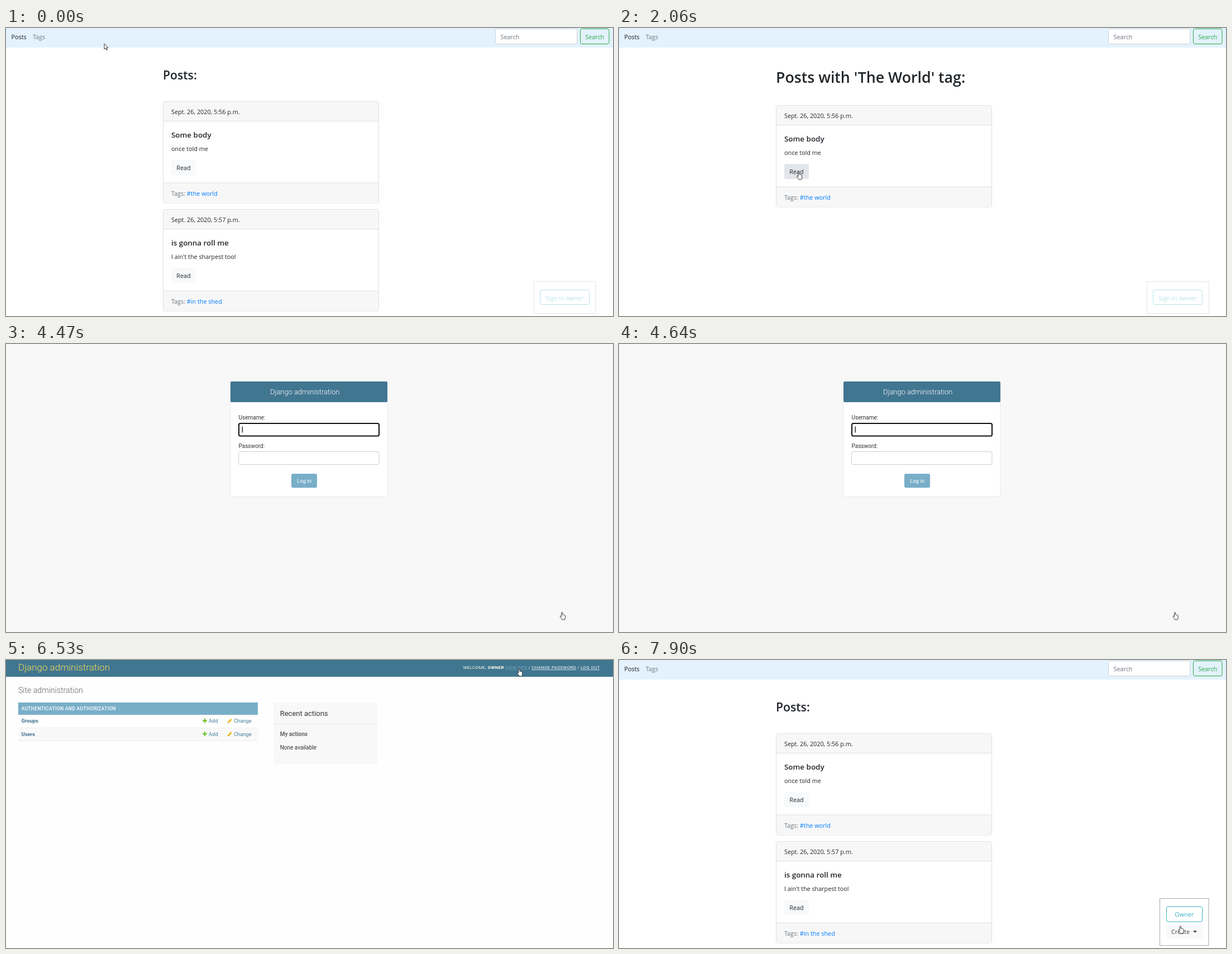
Recreate the animation shown at these times as an HTML page. Size 1087x515 px, loop 8 s.

```html
<!DOCTYPE html>
<html lang="en">
<head>
<meta charset="utf-8">
<title>Blog walkthrough</title>
<style>
  html, body { margin: 0; width: 100%; height: 100%; overflow: hidden; background: #fff; }
  svg { display: block; width: 100vw; height: 100vh; }
  text { white-space: pre; }
  .blog { font: 10.8px "Open Sans", "Noto Sans", sans-serif; }
  .blog .head { font-weight: 600; }
  .panel { font: 10px Roboto, Arial, sans-serif; }
  .caps { letter-spacing: .36px; }
</style>
</head>
<body>
<svg viewBox="0 0 1087 515"><g id="page"></g><g id="cursor"></g></svg>
<script>
const LOOP = 8000, STEP = 172, LEAD = 16;
const INK = '#212529', TEAL = '#17a2b8', NAVY = '#417690', SKY = '#79aec8', LINK = '#447e9b';

const rect = (x, y, w, h, fill, extra = '') =>
  `<rect x="${x}" y="${y}" width="${w}" height="${h}" fill="${fill}" ${extra}/>`;
const box = (x, y, w, h, fill, stroke, r = 3) => rect(x, y, w, h, fill, `stroke="${stroke}" rx="${r}"`);
const text = (x, y, str, fill = INK, extra = '') => `<text x="${x}" y="${y}" fill="${fill}" ${extra}>${str}</text>`;
const mid = (x, y, str, fill, extra = '') => text(x, y, str, fill, `text-anchor="middle" ${extra}`);
const line = (x1, x2, y, stroke) => `<path d="M${x1} ${y}H${x2}" stroke="${stroke}"/>`;
const size = n => `font-size="${n}"`;
const heading = (y, str, px) => text(281, y, str, INK, `class="head" ${size(px)}`);

// Blog pages

const nav = hover =>
  rect(0, 0, 1087, 35, '#e3f2fd') +
  text(9.5, 19.5, 'Posts', 'rgba(0,0,0,.9)') +
  text(48, 19.5, 'Tags', `rgba(0,0,0,${hover ? .7 : .5})`) +
  box(876.5, 1.5, 146, 27, '#fff', '#ced4da') + text(885.5, 20, 'Search', '#6c757d') +
  box(1028.5, 1.5, 51.5, 27, 'none', '#28a745') + mid(1054.2, 19.5, 'Search', '#28a745');

const frame = (y, headH, h) =>
  box(281.5, y + .5, 386, h, '#fff', '#dfdfdf') +
  rect(282, y + 1, 385, headH - 1, '#f7f7f7', 'rx="2"') +
  rect(282, y + h - 35, 385, 35, '#f7f7f7', 'rx="2"') +
  line(282, 667, y + headH + .5, '#dfdfdf') + line(282, 667, y + h - 35.5, '#dfdfdf');

const tagRow = (y, tag, hover) => text(296, y,
  `Tags: <tspan fill="${hover ? '#0056b3' : '#007bff'}" ${hover ? 'text-decoration="underline"' : ''}>#${tag}</tspan>`, '#6c757d');

const card = (y, date, title, body, tag, hover) =>
  frame(y, 35, 181.5) +
  text(296, y + 22.5, `Sept. 26, 2020, ${date} p.m.`) +
  text(296, y + 64.5, title, INK, `class="head" ${size(13.4)}`) +
  text(296, y + 89.3, body) +
  rect(296, y + 105, 44, 27, hover === 'read' ? '#e2e6ea' : '#f8f9fa', 'rx="3"') +
  mid(318, y + 122.7, 'Read', INK) +
  tagRow(y + 168.5, tag, hover === 'tag');

const firstCard = (y, hover) => card(y, '5:56', 'Some body', 'once told me', 'the world', hover);

const signIn = hover => `<g opacity="${hover ? .9 : .3}">` +
  box(945.5, 453.5, 110.5, 57, '#fff', '#aaa', 0) +
  box(956.5, 468.5, 88, 26, 'none', TEAL) + mid(1000.3, 486.7, 'Sign in owner', TEAL) + '</g>';

const tools = hover => `<g opacity="${hover ? .85 : .3}">` +
  box(968.5, 426.5, 87.5, 84, '#fff', '#999', 0) +
  box(980.5, 441, 64, 27, 'none', TEAL) + mid(1012.3, 459, 'Owner', TEAL) +
  rect(980, 472, 65, 27, '#f8f9fa', 'rx="3"') + text(989, 490, 'Create') +
  `<path d="M1028 484h7l-3.5 3.7z" fill="${INK}"/></g>`;

const blog = body => `<g class="blog">${rect(0, 0, 1087, 515, '#fff')}${body}</g>`;

const posts = (k, corner) => blog(
  nav([3, 4, 21, 22].includes(k)) + heading(92, 'Posts:', 21.2) +
  firstCard(131, k === 7 || k === 8 ? 'tag' : '') +
  card(324, '5:57', 'is gonna roll me', "I ain't the sharpest tool", 'in the shed') + corner);

const tagged = k => blog(
  nav() + heading(98, "Posts with 'The World' tag:", 26.7) +
  firstCard(138, k >= 11 ? 'read' : '') + signIn());

const detail = () => blog(
  nav() + frame(69, 35, 250.5) + text(296, 91.5, 'Sept. 26, 2020, 5:56 p.m.') +
  text(295, 138, 'Some body', INK, `class="head" ${size(26.7)}`) +
  text(296, 170, 'once told me') + tagRow(306.5, 'the world') + signIn());

// Back office pages

const login = k => {
  const filled = k >= 30, pressed = k >= 32;
  const field = (y, fill, focus) => focus
    ? rect(417, y + .5, 251, 22.5, fill, 'stroke="#101010" stroke-width="2" rx="2.5"')
    : box(416.5, y, 251.5, 23, fill, '#ccc');
  return '<g class="panel">' + rect(0, 0, 1087, 515, '#f8f8f8') +
    box(401.9, 67.5, 281, 205.5, '#fff', '#eaeaea') +
    rect(402, 67, 281, 37, NAVY, 'rx="2"') +
    mid(535.2, 90, 'Django administration', '#fff', `font-weight="300" ${size(12.9)}`) +
    text(416.5, 135, 'Username:', '#333') + field(141.5, filled ? '#e8f0fe' : '#fff', !filled) +
    text(416.5, 186, 'Password:', '#333') + field(192.5, '#fff') +
    (filled
      ? text(423, 156.5, 'owner', '#222', size(9.5)) + text(422.5, 207, '•••••', '#222', size(9.2)) +
        rect(651.5, 197.5, 10.5, 10, '#777')
      : rect(422.7, 147.5, 1.2, 11, '#000')) +
    rect(511, 232, 46, 25, pressed ? '#609ab6' : SKY, pressed ? 'rx="2" stroke="#101010" stroke-width="2"' : 'rx="3"') +
    mid(534, 247.6, 'Log in', '#fff', size(9.6)) + '</g>';
};

const modelRow = (y, name) =>
  text(27.5, y, name, NAVY, `font-weight="700" ${size(9.4)}`) +
  `<path d="M352 ${y - 3.7}h8m-4-4v8" stroke="#70bf2b" stroke-width="2.2"/>` +
  text(363, y, 'Add', LINK, size(9.4)) +
  `<path d="M398.2 ${y - .8}l5.5-5.5" stroke="#efb80b" stroke-width="2.8"/>` +
  `<path d="M396.8 ${y + .6}l.6-2.2 1.6 1.6z" fill="#b58a3c"/>` +
  text(408, y, 'Change', LINK, size(9.4));

const userLink = (x, w, str, fill) =>
  text(x, 16, str, fill) + line(x, x + w, 17.6, fill === '#fff' ? '#d0dde3' : '#5f93ab');

const dashboard = k => '<g class="panel">' + rect(0, 0, 1087, 515, '#fefefe') + rect(0, 0, 1087, 30, NAVY) +
  text(22, 18.7, 'Django administration', '#f5dd5d', `font-weight="300" ${size(17)}`) +
  `<g class="caps" ${size(7.9)}>` +
  text(818.5, 16, 'WELCOME, <tspan font-weight="700">OWNER</tspan>.', '#ffe') +
  userLink(894, 39, 'VIEW SITE', k >= 38 ? SKY : '#fff') + text(935.5, 16, '/', '#fff') +
  userLink(941, 80, 'CHANGE PASSWORD', '#fff') + text(1023, 16, '/', '#fff') +
  userLink(1029, 34, 'LOG OUT', '#fff') + '</g>' +
  text(22, 58.5, 'Site administration', '#666', `font-weight="300" ${size(14.1)}`) +
  rect(22, 76, 429, 22, SKY) +
  text(27.5, 90, 'AUTHENTICATION AND AUTHORIZATION', '#fff', `class="caps" font-weight="500" ${size(8.5)}`) +
  rect(22, 121, 429, 23, '#f9f9f9') + line(22, 451, 121.5, '#eee') + line(22, 451, 144.5, '#eee') +
  modelRow(112.3, 'Groups') + modelRow(135.7, 'Users') +
  rect(479, 76, 186, 109, '#f8f8f8') + line(479, 665, 114.5, '#eaeaea') +
  text(490.7, 99.6, 'Recent actions', '#333', size(13)) +
  text(490.7, 136, 'My actions', '#666', 'font-weight="700"') +
  text(490.7, 160, 'None available', '#333') + '</g>';

// Pointer: [step, x, y, is hand]; straight moves between the stops
const stops = [
  [0, 176, 28], [1, 80, 21], [2, 32, 9, 1], [3, 56, 14, 1], [4, 56, 14, 1],
  [5, 130, 90], [7, 342, 291, 1], [8, 345, 293, 1], [9, 345, 293], [11, 324, 261, 1],
  [12, 322, 257, 1], [13, 322, 257, 1], [14, 322, 257], [18, 82, 26],
  [19, 32, 14, 1], [20, 32, 14, 1], [21, 62, 21], [22, 66, 22], [25, 996, 479, 1],
  [27, 995.5, 479, 1], [28, 790, 310], [29, 560, 160], [30, 545, 172], [32, 541, 247, 1],
  [35, 541, 247, 1], [36, 541, 247], [38, 919, 15, 1], [39, 919, 15, 1],
  [40, 919, 15], [44, 1008, 462, 1], [46, 1005.3, 475, 1]
];

function pointer(k) {
  const i = stops.findLastIndex(s => s[0] <= k), a = stops[i], b = stops[i + 1] || a;
  const p = b === a ? 0 : (k - a[0]) / (b[0] - a[0]);
  const hand = a[3] && (p === 0 || b[3]);
  const x = a[1] + (b[1] - a[1]) * p, y = a[2] + (b[2] - a[2]) * p;
  const shape = hand
    ? 'M-1 1.3Q0 0 1 1.3V5Q2 4.4 2.7 5.4Q3.7 4.9 4.2 6Q5.6 5.7 5.7 7.2V10Q5.6 12 4.7 14H.1Q-.5 12.3-3.2 9Q-4 7.5-2.8 7.2Q-2 7-1 8.4Z'
    : 'M0 0V10L2.2 8L3.8 11.6L5.4 10.9L3.9 7.4H6.8Z';
  return `<path transform="translate(${x} ${y})" d="${shape}" fill="#fff" stroke="#222" stroke-width=".9" stroke-linejoin="round"/>`;
}

function page(k) {
  if (k < 9) return posts(k, signIn());
  if (k < 14) return tagged(k);
  if (k < 20) return detail();
  if (k < 26) return posts(k, signIn(k === 25));
  if (k < 36) return login(k);
  if (k < 40) return dashboard(k);
  return posts(k, tools(k >= 44));
}

const pageLayer = document.getElementById('page'), cursorLayer = document.getElementById('cursor');
let shown = -1;

function draw(now) {
  const k = Math.min(46, Math.floor((now % LOOP + LEAD) / STEP));
  if (k !== shown) {
    pageLayer.innerHTML = page(k);
    cursorLayer.innerHTML = pointer(k);
    shown = k;
  }
}

const start = performance.now();
function tick() {
  draw(performance.now() - start);
  requestAnimationFrame(tick);
}
tick();
</script>
</body>
</html>
```
